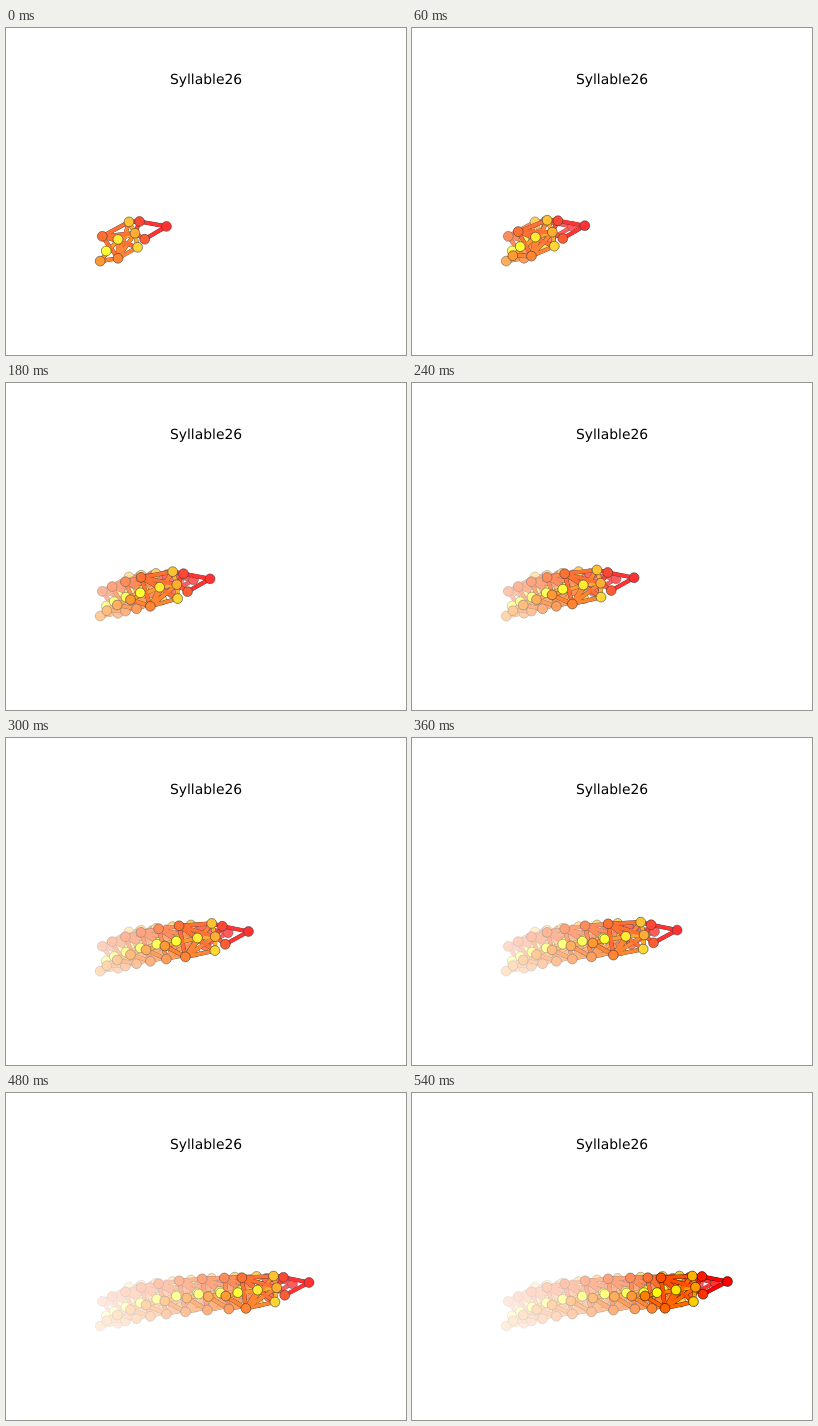
An HTML page with a canvas for the animation above (0.6 s loop, 400x327 px).

```html
<!DOCTYPE html>
<html lang="en">
<head>
<meta charset="utf-8">
<title>Syllable26</title>
<style>
  html, body { margin: 0; width: 100%; height: 100%; overflow: hidden; background: #fff; }
  canvas, svg { position: absolute; left: 0; top: 0; width: 400px; height: 327px; }
  text { font: 13.89px "DejaVu Sans", sans-serif; text-rendering: geometricPrecision; }
</style>
</head>
<body>
<canvas id="stage" width="400" height="327"></canvas>
<svg viewBox="0 0 400 327"><text x="164" y="56">Syllable26</text></svg>
<script>
const STEPS = 10, STEP_MS = 60, VEIL = 0.2, LINE = 4.17;

// lag: how late a part moves forward; rise: how early it moves up.
const part = (from, to, lag, rise) => ({ from, to, lag, rise });
const parts = [
  part([160.5, 198.4], [315.5, 188.5], 1, 0.9),    // nose
  part([133.5, 193.5], [290, 183.5], 1, 1),        // left ear
  part([138.7, 211.2], [291, 201.2], 1, 0.9),      // right ear
  part([96.3, 208.3], [249, 184.7], 1.08, 2.7),    // left hip
  part([112, 230.3], [253, 215.3], 1.16, 1.9),     // right hip
  part([94.2, 233.1], [233, 203], 1.2, 2.4),       // tail base
  part([129, 205.2], [283.5, 194.2], 1.03, 1.2),   // neck
  part([123, 193.9], [280.3, 183], 1.01, 2),       // left shoulder
  part([131.6, 219.3], [281.5, 208.6], 1.04, 1.3), // right shoulder
  part([112, 211.4], [264, 197], 1.02, 2.1),       // mid spine
  part([100.2, 223], [245, 199.6], 1.14, 2.5)      // low spine
];

// Later edges lie on top, so the warm hip and head lines cover the yellow ones.
const edges = ["6-9", "6-8", "6-7", "5-9", "4-9", "4-8", "4-7", "4-6", "4-5",
  "3-9", "3-8", "3-7", "3-6", "3-4", "2-6", "1-7", "1-6", "0-2", "0-1"]
  .map(e => e.split("-").map(Number));

const color = i => `rgb(255,${Math.round(25.5 * i)},0)`;
const mix = (a, b, k) => a + (b - a) * k;

// Forward progress of the run: slow start, fast middle, short slowdown.
function progress(u) {
  const a = Math.PI * u;
  const p = u - 0.0403 * Math.sin(2 * a) - 0.0054 * Math.sin(4 * a) - 0.039 * Math.sin(a) ** 4;
  return Math.min(1, Math.max(0, p));
}

const poses = Array.from({ length: STEPS }, (_, i) => {
  const p = progress(i / (STEPS - 1));
  return parts.map(({ from, to, lag, rise }) => [
    mix(from[0], to[0], p ** lag),
    mix(from[1], to[1], 1 - (1 - p) ** rise)
  ]);
});

const ctx = document.getElementById("stage").getContext("2d");

function drawEdges(pose, width, paint) {
  ctx.lineWidth = width;
  for (const [a, b] of edges) {
    ctx.strokeStyle = paint(a);
    ctx.beginPath();
    ctx.moveTo(...pose[a]);
    ctx.lineTo(...pose[b]);
    ctx.stroke();
  }
}

function drawPose(pose) {
  drawEdges(pose, LINE, () => "#000");
  drawEdges(pose, LINE * 0.9, color);
  ctx.lineWidth = 0.56;
  ctx.strokeStyle = "#000";
  pose.forEach(([x, y], i) => {
    ctx.fillStyle = color(i);
    ctx.beginPath();
    ctx.arc(x, y, 4.91, 0, 2 * Math.PI);
    ctx.fill();
    ctx.stroke();
  });
}

function fill(alpha) {
  ctx.fillStyle = `rgba(255,255,255,${alpha})`;
  ctx.fillRect(0, 0, 400, 327);
}

// Each pose is veiled in white as the next arrives; the final one stays bare.
function draw(step) {
  fill(1);
  for (let i = 0; i <= step; i++) {
    drawPose(poses[i]);
    if (i < STEPS - 1) fill(VEIL);
  }
}

let shown = -1;
function tick() {
  const step = Math.floor(performance.now() / STEP_MS) % STEPS;
  if (step !== shown) draw(shown = step);
  requestAnimationFrame(tick);
}
tick();
</script>
</body>
</html>
```
